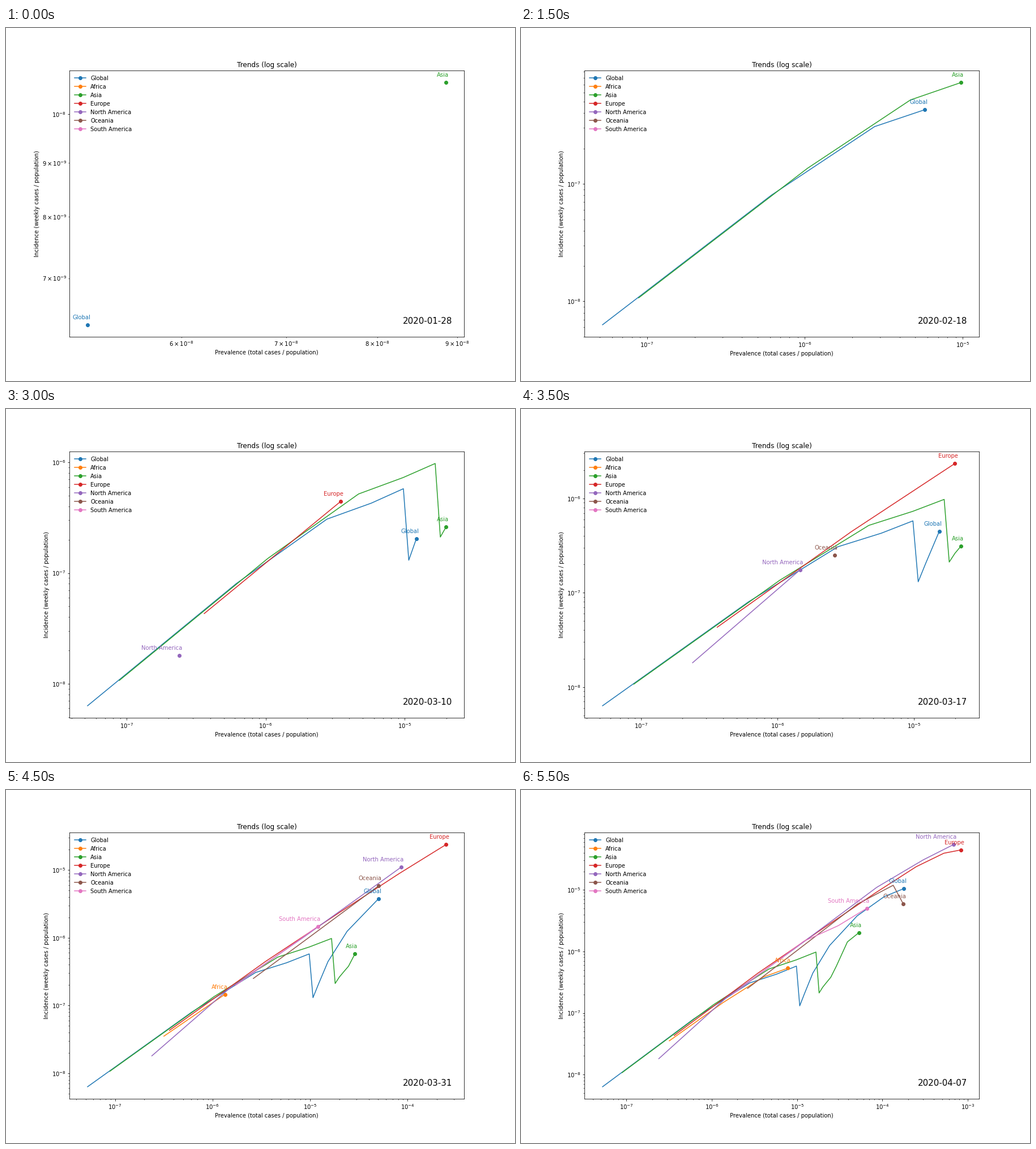
These frames come from a looping animation (899 by 623 pixels, 7500 ms). A matplotlib script:

```python
import numpy as np
import matplotlib.pyplot as plt
from matplotlib.animation import FuncAnimation

W, H, DPI = 899, 623, 72
WEEKS = 12
HOLD = 3  # extra steps resting on the last week

# name: (first week, earlier total, mean daily cases per week), in 1e-8 of population
REGIONS = {
    "Global": (0, 0.80, [0.6325, 8.01, 30.7, 42.8, 57.8, 13.06, 20.4, 44.5,
                         124.6, 377.5, 776, 1050]),
    "Africa": (8, 7.0, [3.53, 14.65, 38.5, 53.5]),
    "Asia": (0, 1.35, [1.072, 13.55, 51.8, 72.9, 97.7, 21.15, 26.2, 31.4,
                       38.0, 57.8, 143, 202]),
    "Europe": (5, 6.0, [4.305, 44.4, 234.8, 886, 2382, 3940, 4470]),
    "North America": (6, 11.2, [1.808, 17.56, 103.4, 1099, 3080, 5470]),
    "Oceania": (7, 86.5, [25.1, 98.8, 583, 1190, 594]),
    "South America": (8, 33.0, [20.0, 146.4, 262.5, 502]),
}

plt.rcParams["font.family"] = "DejaVu Sans"
fig, ax = plt.subplots(figsize=(W / DPI, H / DPI), dpi=DPI, facecolor="white")
fig.subplots_adjust(left=0.125, right=0.9, bottom=0.125, top=0.88)
ax.set_xscale("log")
ax.set_yscale("log")
ax.set_title("Trends (log scale)")
ax.set_xlabel("Prevalence (total cases / population)")
ax.set_ylabel("Incidence (weekly cases / population)")


class Trail:
    """A region's path so far, with a dot and a name at its head."""

    def __init__(self, name, start, base, rates):
        self.start = start
        self.y = np.array(rates) * 1e-8
        self.x = base * 1e-8 + 7 * np.cumsum(self.y)
        self.line, = ax.plot([], [], "o-", label=name, markevery=[-1])
        self.tag = ax.annotate(name, (1, 1), xytext=(5, 10),
                               textcoords="offset points", ha="right",
                               color=self.line.get_color())

    def show(self, week):
        n = max(week - self.start + 1, 0)
        self.line.set_data(self.x[:n], self.y[:n])
        self.line.set_markevery([n - 1] if n else None)
        self.tag.set_visible(n > 0)
        if n:
            self.tag.xy = self.x[n - 1], self.y[n - 1]


trails = [Trail(name, *spec) for name, spec in REGIONS.items()]
ax.legend(loc="upper left", frameon=False)
date = ax.text(0.97, 0.05, "", transform=ax.transAxes, ha="right", size=15)


def update(i):
    week = min(i, WEEKS - 1)
    shown = [t for t in trails if t.start <= week]
    for t in trails:
        t.show(week)
    ax.relim()
    ax.autoscale_view()
    # the date label stops one week before the data does
    date.set_text(str(np.datetime64("2020-01-28") + 7 * min(week, WEEKS - 2)))
    return [t.line for t in shown] + [t.tag for t in shown] + [date]


anim = FuncAnimation(fig, update, frames=WEEKS + HOLD, interval=500,
                     repeat=True, repeat_delay=0, blit=False)
plt.show()
```
